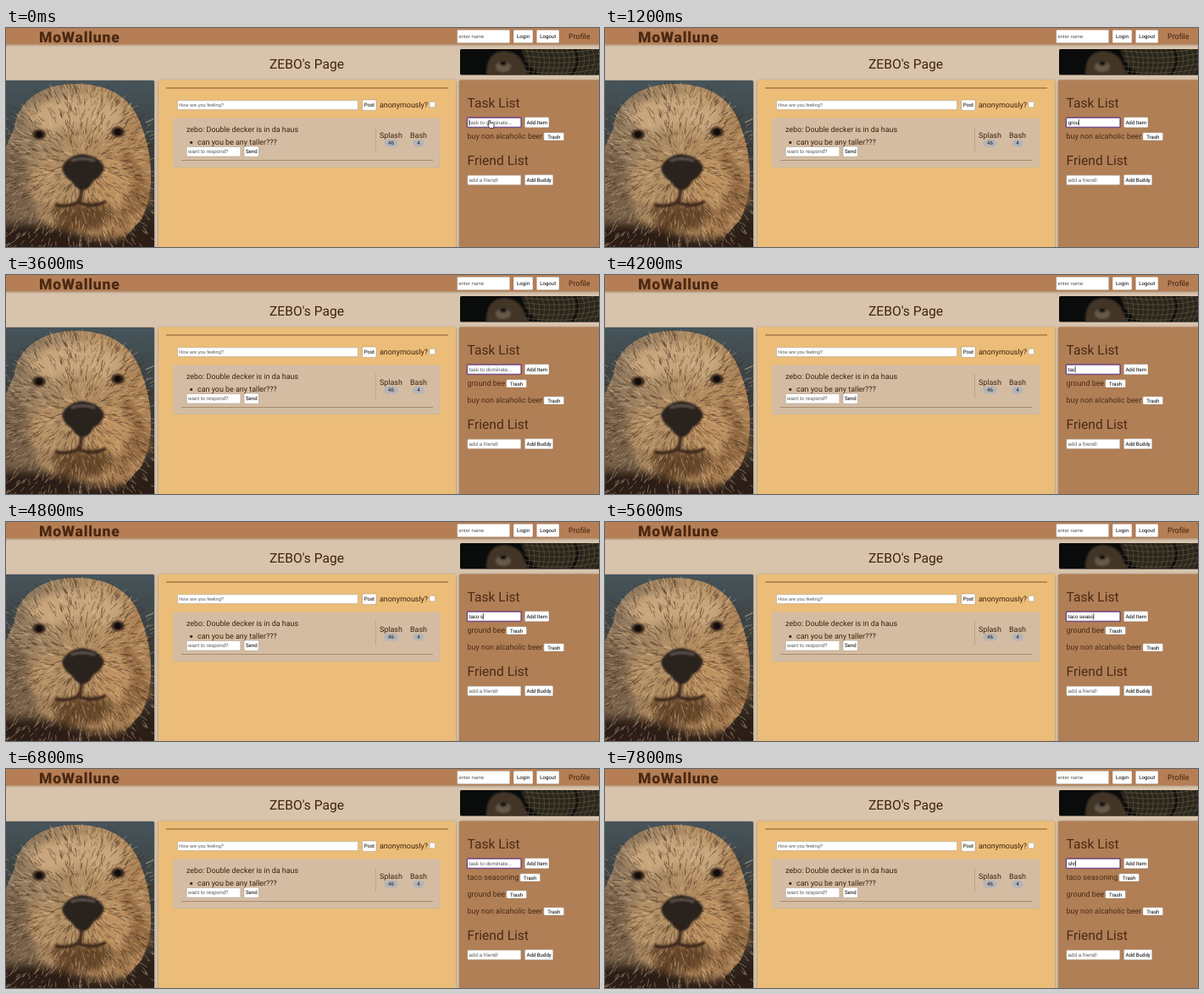
Animation of 700x259 px, one loop 8 s. Source, as an HTML page:

```html
<!DOCTYPE html>
<html lang="en">
<head>
<meta charset="utf-8">
<title>Task list</title>
<style>
html, body { margin: 0; width: 100%; height: 100%; overflow: hidden; background: #d8c4ad; }
svg { display: block; width: 100%; height: 100%; }
text { font-family: Roboto, sans-serif; font-size: 8.93px; fill: #42210b; white-space: pre; text-rendering: geometricPrecision; }
.title { font-size: 15.6px; }
.side { fill: #4c2a14; }
.btn { font-size: 6.1px; fill: #000; text-anchor: middle; }
.field { font-family: "Liberation Sans", Arial, sans-serif; font-size: 6.2px; fill: #000; }
.hint { fill: #555; }
.badge { font-size: 6.3px; fill: #222; text-anchor: middle; }
.logo { font-weight: 900; font-size: 17.6px; letter-spacing: .75px; fill: #4a2813; }
</style>
</head>
<body>
<svg id="stage" viewBox="0 0 700 259" preserveAspectRatio="none">
  <defs>
    <filter id="shadow" x="-5%" y="-20%" width="110%" height="150%">
      <feDropShadow dx="0" dy=".6" stdDeviation="1.1" flood-color="#3a2008" flood-opacity=".5"/>
    </filter>
    <filter id="soft" x="-30%" y="-30%" width="160%" height="160%"><feGaussianBlur stdDeviation="5"/></filter>
    <filter id="soft2" x="-30%" y="-30%" width="160%" height="160%"><feGaussianBlur stdDeviation="1.2"/></filter>
    <linearGradient id="water" x1="0" y1="0" x2="0" y2="1">
      <stop offset="0" stop-color="#46545a"/><stop offset="1" stop-color="#2a2019"/>
    </linearGradient>
    <linearGradient id="head" x1="0" y1=".2" x2="1" y2=".6">
      <stop offset="0" stop-color="#85725d"/><stop offset=".5" stop-color="#b08c62"/><stop offset="1" stop-color="#b08355"/>
    </linearGradient>
    <clipPath id="photoClip"><path d="M0 62H173a2 2 0 0 1 2 2V259H0z"/></clipPath>
    <clipPath id="stripClip"><rect x="536" y="25" width="165" height="30.5" rx="1.5"/></clipPath>
  </defs>

  <rect width="700" height="259" fill="#d8c4ad"/>
  <rect x="-5" y="-5" width="710" height="24.3" fill="#b57e55" filter="url(#shadow)"/>
  <text class="logo" x="39" y="17">MoWallune</text>
  <text x="664" y="13">Profile</text>
  <text class="title" x="355" y="48" text-anchor="middle">ZEBO's Page</text>

  <rect x="0" y="62" width="175" height="210" rx="2" fill="#74583a" filter="url(#shadow)"/>
  <g clip-path="url(#photoClip)">
    <rect y="62" width="175" height="197" fill="url(#water)"/>
    <path d="M10 118C14 82 48 66 82 66C124 66 152 84 162 122C172 150 177 190 160 226L128 262H20L-4 236V150z" fill="url(#head)"/>
    <g filter="url(#soft)">
      <path d="M22 104Q75 58 142 98L124 128Q86 104 50 128z" fill="#c8a57b"/>
      <path d="M-8 145L24 150L40 235L-8 245z" fill="#77614a"/>
      <path d="M138 145Q165 160 172 205L130 240z" fill="#91683f"/>
      <ellipse cx="54" cy="184" rx="28" ry="28" fill="#b18d63"/>
      <ellipse cx="124" cy="184" rx="24" ry="27" fill="#bd9160"/>
      <path d="M50 213Q90 200 130 213L112 238H64z" fill="#6b4a2c"/>
      <path d="M-8 232Q40 226 88 244T180 222V270H-8z" fill="#2c1e15"/>
    </g>
    <g id="fur" fill="none" stroke-width=".9"></g>
    <g filter="url(#soft2)">
      <ellipse cx="39" cy="126" rx="8" ry="6" fill="#38281b"/>
      <ellipse cx="132" cy="123" rx="8" ry="6" fill="#38281b"/>
      <path d="M66 165Q72 151 90 149Q109 151 116 164Q115 174 103 181Q98 192 90 192Q82 190 78 182Q67 175 66 165z" fill="#29211d"/>
      <path d="M89 191Q89 203 84 207Q70 213 58 209M87 207Q103 213 118 205" fill="none" stroke="#3c281a" stroke-width="4"/>
      <path d="M77 157Q90 152 105 157" fill="none" stroke="#5d534d" stroke-width="3"/>
    </g>
    <circle cx="39" cy="126" r="3.8" fill="#120d0a"/><circle cx="132" cy="123" r="3.8" fill="#120d0a"/>
  </g>

  <g clip-path="url(#stripClip)">
    <rect x="536" y="25" width="165" height="31" fill="#0a0b0b"/>
    <g filter="url(#soft2)">
      <path d="M567 56Q566 29 587 27Q607 28 612 45L617 56z" fill="#423628"/>
      <ellipse cx="587" cy="46" rx="9" ry="6" fill="#665a48"/>
      <ellipse cx="587" cy="42" rx="4" ry="2.5" fill="#0f0d0c"/>
      <path d="M608 25H700V56H632Q612 44 608 25z" fill="#2a271d"/>
      <path d="M672 25Q680 42 666 56" fill="none" stroke="#0a0b0b" stroke-width="4"/>
    </g>
    <path id="scales" fill="none" stroke="#706347" stroke-width="1" opacity=".5"/>
  </g>

  <rect x="180" y="61.5" width="351" height="210" rx="2" fill="#ebbd78" filter="url(#shadow)"/>
  <rect x="535" y="61.5" width="170" height="210" rx="2" fill="#b07f57" filter="url(#shadow)"/>
  <path d="M189 71H522" stroke="#875530"/>
  <text x="441" y="94">anonymously?</text>
  <rect x="500" y="87.3" width="6.5" height="6.5" rx="1.2" fill="#fff" stroke="#999" stroke-width=".5"/>

  <rect x="197" y="106.5" width="315.5" height="58.5" rx="1.5" fill="#d3bca2"/>
  <path d="M197.5 164.5H512V107" fill="none" stroke="#cbb7a0"/>
  <path d="M207 156.5H504" stroke="#a58467" stroke-width=".9"/>
  <path d="M436.5 117V146" stroke="#b99f82" stroke-width=".8"/>
  <text x="213" y="123.3">zebo: Double decker is in da haus</text>
  <rect x="217.3" y="134" width="2.8" height="2.8" fill="#42210b"/>
  <text x="226" y="138.2">can you be any taller???</text>
  <text x="441" y="130">Splash</text>
  <text x="477" y="130">Bash</text>
  <rect x="446.5" y="131.8" width="16" height="8.6" rx="4.3" fill="#b3b4b8"/>
  <rect x="480.5" y="131.8" width="13" height="8.6" rx="4.3" fill="#b3b4b8"/>
  <text class="badge" x="454.5" y="138.3">46</text>
  <text class="badge" x="487" y="138.3">4</text>
  <g id="controls"></g>

  <text class="title side" x="544.6" y="93.5">Task List</text>
  <g id="focus">
    <rect x="543.6" y="105.2" width="65.3" height="13" rx="1.6" fill="#8a4a70"/>
    <rect x="544.6" y="106.2" width="63.3" height="11" rx=".8" fill="#fff" stroke="#51307c" stroke-width=".8"/>
    <text id="entry" class="field" x="546.7" y="114.1"></text>
    <path id="caret" stroke="#111" stroke-width=".7"/>
  </g>
  <g id="rows"></g>
  <g id="friends">
    <text class="title side" x="544.6" y="161.5">Friend List</text>
  </g>
  <path id="hand" d="M570 109.5q1-1 1.8 0v3.2q.8-.7 1.5.1q.9-.6 1.5.2q1-.4 1.3.6v2.4l-1 2.4h-4l-2.6-3.8q.2-1.3 1.5-.1z" fill="#fff" stroke="#111" stroke-width=".7"/>
</svg>
<script>
const $ = id => document.getElementById(id);
const LOOP = 8000, STEP = 200;

const button = (x, y, w, h, label) =>
  `<rect x="${x}" y="${y}" width="${w}" height="${h}" rx="1.3" fill="#fff" stroke="#8f7a66" stroke-width=".4"/>
   <text class="btn" x="${x + w / 2}" y="${y + h / 2 + 2.1}">${label}</text>`;

const field = (x, y, w, h, hint, size = 6.2) =>
  `<rect x="${x}" y="${y}" width="${w}" height="${h}" rx=".8" fill="#fff" stroke="#a79a8c" stroke-width=".5"/>
   <text class="field hint" x="${x + 1.8}" y="${y + h / 2 + 2.2}" style="font-size:${size}px">${hint}</text>`;

$('controls').innerHTML =
  field(532.7, 2.3, 62, 15.4, 'enter name', 5.9) +
  button(599, 2.3, 23, 15.4, 'Login') +
  button(626.3, 2.3, 26.7, 15.4, 'Logout') +
  field(202.5, 85.8, 213, 10.8, 'How are you feeling?', 5.6) +
  button(420.7, 85, 16.3, 12.4, 'Post') +
  field(213.3, 140.5, 63.5, 11.4, 'want to respond?', 6.2) +
  button(281, 140, 17.5, 12.2, 'Send') +
  button(612.4, 105.6, 28.6, 12.2, 'Add Item');
$('friends').innerHTML +=
  field(544.8, 174.2, 63, 11.2, 'add a friend!') +
  button(612.4, 173.6, 33.4, 12.2, 'Add Buddy');

// Fur strands radiate from the nose.
function drawFur() {
  let seed = 7;
  const rnd = () => (seed = seed * 16807 % 2147483647) / 2147483647;
  const strands = (n, color, opacity) => {
    let d = '';
    while (n--) {
      const x = rnd() * 172, y = 68 + rnd() * 190;
      const a = Math.atan2(y - 160, x - 90) + (rnd() - .5) * .8, l = 3 + rnd() * 8;
      if (y < 68 + ((x - 82) / 82) ** 2 * 42) continue;
      d += `M${x.toFixed(1)} ${y.toFixed(1)}l${(Math.cos(a) * l).toFixed(1)} ${(Math.sin(a) * l).toFixed(1)}`;
    }
    return `<path d="${d}" stroke="${color}" opacity="${opacity}"/>`;
  };
  $('fur').innerHTML = strands(1100, '#3a291a', .5) + strands(700, '#e3c59a', .45);
}

function drawScales() {
  let d = '';
  for (let i = 0; i < 15; i++) d += `M${614 + i * 6} 25q7 15 ${2 - i * .5} 31`;
  for (let j = 0; j < 5; j++) d += `M612 ${27 + j * 6}q45 6 90 -3`;
  $('scales').setAttribute('d', d);
}

// Each entry types one letter per step; "add" moves it to the list.
const entries = [
  { text: 'ground bee', start: 600, add: 3000 },
  { text: 'taco seasoning', start: 3600 + STEP, add: 6800 },
  { text: 'shr', start: 7400, add: Infinity }
];

const typedAt = t => {
  const e = entries.find(e => t >= e.start && t < e.add);
  return e ? e.text.slice(0, Math.floor((t - e.start) / STEP + 1e-6) + 1) : '';
};

let last = -1;
function render(t) {
  if (t === last) return;
  last = t;
  const typed = typedAt(t), entry = $('entry');
  entry.textContent = typed || 'task to dominate...';
  entry.setAttribute('class', typed ? 'field' : 'field hint');
  const caretX = 546.9 + (typed ? entry.getComputedTextLength() : 0);
  $('caret').setAttribute('d', `M${caretX} 108v7.4`);
  const blink = !typed && t % 1000 >= 400;
  $('caret').style.display = blink ? 'none' : '';
  $('hand').style.display = t < STEP ? '' : 'none';

  const tasks = entries.filter(e => t >= e.add).map(e => e.text).reverse();
  tasks.push('buy non alcaholic beer');
  const rows = $('rows');
  rows.innerHTML = tasks.map((s, i) => `<g><text class="side" x="544.6" y="${130.7 + i * 20}">${s}</text></g>`).join('');
  [...rows.children].forEach((row, i) => {
    const w = row.firstChild.getComputedTextLength();
    row.innerHTML += button(546.1 + w, 123.8 + i * 20, 23.8, 9.2, 'Trash');
  });
  $('friends').setAttribute('transform', `translate(0 ${(tasks.length - 1) * 20})`);
}

drawFur();
drawScales();
const begin = performance.now();
function tick() {
  const t = (performance.now() - begin) % LOOP;
  render(Math.floor(t / STEP) * STEP);
  requestAnimationFrame(tick);
}
tick();
</script>
</body>
</html>
```
